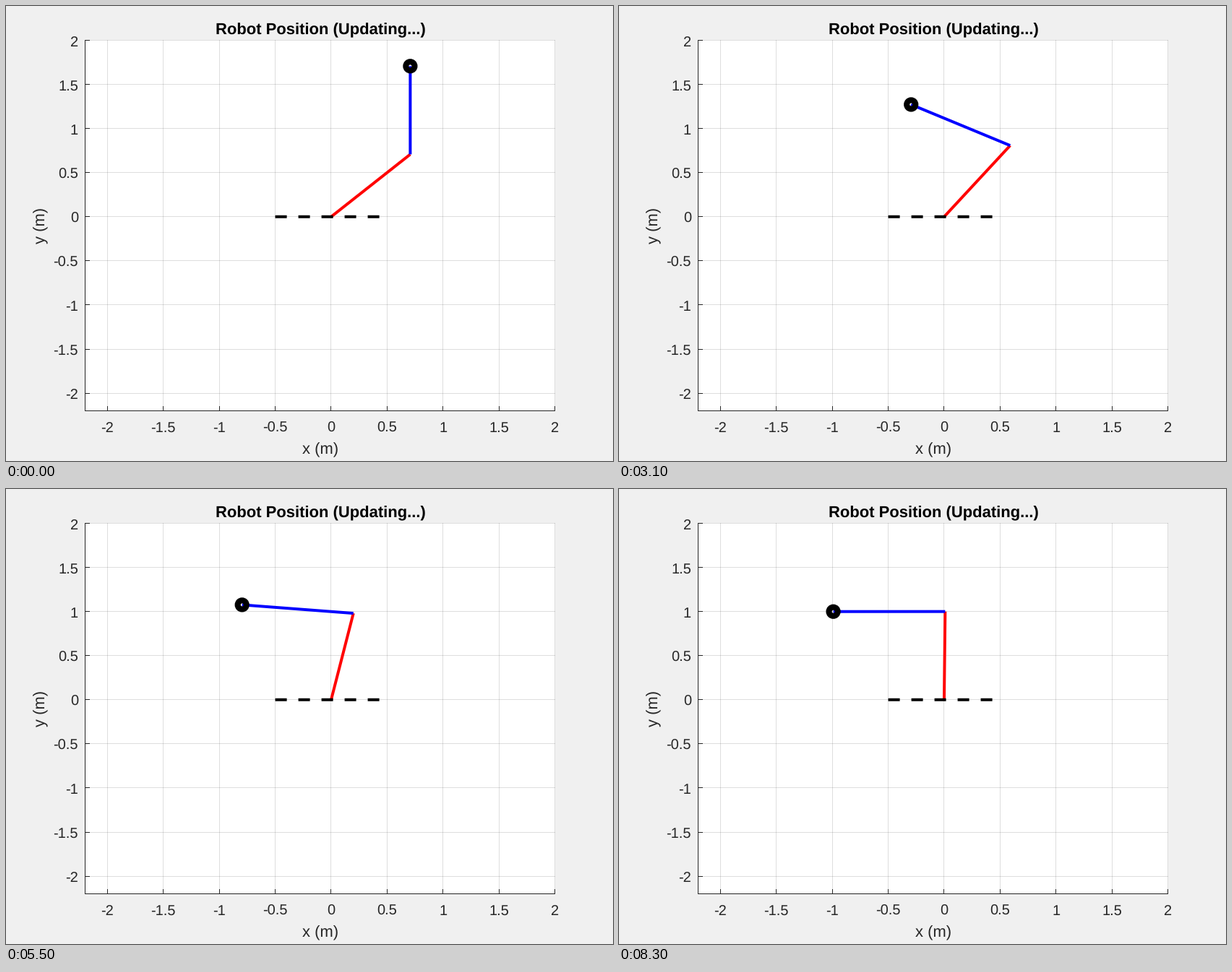
A matplotlib script that plays this animation: 840 by 630 pixels, repeating every 8.35 s.

```python
import numpy as np
import matplotlib.pyplot as plt
from matplotlib.animation import FuncAnimation
from matplotlib.patches import Circle, Rectangle

plt.rcParams["font.family"] = "Liberation Sans"
plt.rcParams["text.hinting"] = "no_hinting"
plt.rcParams["path.snap"] = False

W, H, DPI = 840, 630, 100
LEFT, RIGHT, TOP, BOTTOM = 109.5, 759.5, 47.5, 560.5
LOW, HIGH = -2.2, 2.0
TICK = 6.5
DARK = "#262626"
FRAMES, INTERVAL, HOLD = 167, 50, 6

# Path of the arm's tip in metres, one point every STEP frames
STEP = 17
TIP = np.array([
    (0.7071, 1.7071), (0.424, 1.590), (0.0765, 1.426), (-0.221, 1.303),
    (-0.4535, 1.206), (-0.641, 1.132), (-0.783, 1.081), (-0.880, 1.042),
    (-0.9505, 1.015), (-0.985, 1.002), (-0.996, 0.997),
])
SLOPE = np.gradient(TIP, axis=0)
SLOPE[0] = 0
SLOPE[1] = (-0.349, -0.162)


def pt(px):
    return px * 72 / DPI


def to_x(v):
    return LEFT + (v - LOW) / (HIGH - LOW) * (RIGHT - LEFT)


def to_y(v):
    return BOTTOM - (v - LOW) / (HIGH - LOW) * (BOTTOM - TOP)


def tip_at(n):
    """Cubic Hermite curve through the tip points."""
    k, r = divmod(n, STEP)
    u = r / STEP
    ease = u * u * (3 - 2 * u)
    return (TIP[k] + ease * (TIP[k + 1] - TIP[k])
            + u * (1 - u) ** 2 * SLOPE[k] - u * u * (1 - u) * SLOPE[k + 1])


def elbow_for(tip):
    """Inverse kinematics for two links of 1 m."""
    angle = np.arctan2(tip[1], tip[0]) - np.arccos(np.hypot(*tip) / 2)
    return np.cos(angle), np.sin(angle)


fig = plt.figure(figsize=(W / DPI, H / DPI), dpi=DPI, facecolor="#f0f0f0")
ax = fig.add_axes([0, 0, 1, 1])
ax.set_xlim(0, W)
ax.set_ylim(H, 0)
ax.axis("off")


def line(xs, ys, color, width=1, **kw):
    return ax.plot(xs, ys, color=color, lw=pt(width),
                   solid_capstyle="butt", **kw)[0]


def label(x, y, text, size, color=DARK, ha="center", **kw):
    ax.text(x, y, text, fontsize=pt(size), color=color, ha=ha,
            va="baseline", rotation_mode="anchor", **kw)


ax.add_patch(Rectangle((LEFT - 0.5, TOP - 0.5), RIGHT - LEFT + 1,
                       BOTTOM - TOP + 1, fc="white", ec="none", zorder=0))

for v in np.arange(-2, 2.1, 0.5):
    # Grid lines sit on whole pixels
    x, y = np.floor(to_x(v)) + 0.5, np.floor(to_y(v)) + 0.5
    line([x, x], [TOP - 0.5, BOTTOM], DARK, alpha=0.15, zorder=1)
    line([LEFT, RIGHT + 0.5], [y, y], DARK, alpha=0.15, zorder=1)
    line([x, x], [BOTTOM, BOTTOM - TICK], DARK, zorder=2)
    line([LEFT, LEFT + TICK], [y, y], DARK, zorder=2)
    label(to_x(v), 590, f"{v:g}", 20)
    label(100, to_y(v) + 8, f"{v:g}", 20, ha="right")

line([LEFT, LEFT], [TOP - 0.5, BOTTOM + 0.5], DARK, zorder=2)
line([LEFT - 0.5, RIGHT + 0.5], [BOTTOM, BOTTOM], DARK, zorder=2)

label(435, 39, "Robot Position (Updating...)", 22, "black", weight="bold")
label(435, 620, "x (m)", 22)
label(54, 303.5, "y (m)", 22, rotation=90)

lower = line([], [], "red", 4, zorder=3)
upper = line([], [], "blue", 4, zorder=4)
line([to_x(-0.5), to_x(0.5)], [to_y(0)] * 2, "black", 4,
     linestyle=(0, (4, 4)), dash_capstyle="butt", zorder=5)
hand = Circle((0, 0), 6.1, fill=False, ec="black", lw=pt(8), zorder=6)
ax.add_patch(hand)


def update(i):
    tip = tip_at(max(0, i - HOLD))
    elbow = elbow_for(tip)
    xs = [to_x(v) for v in (0, elbow[0], tip[0])]
    ys = [to_y(v) for v in (0, elbow[1], tip[1])]
    lower.set_data(xs[:2], ys[:2])
    upper.set_data(xs[1:], ys[1:])
    hand.center = xs[2], ys[2]
    return lower, upper, hand


anim = FuncAnimation(fig, update, frames=FRAMES, interval=INTERVAL,
                     repeat=True, repeat_delay=0)
plt.show()
```
